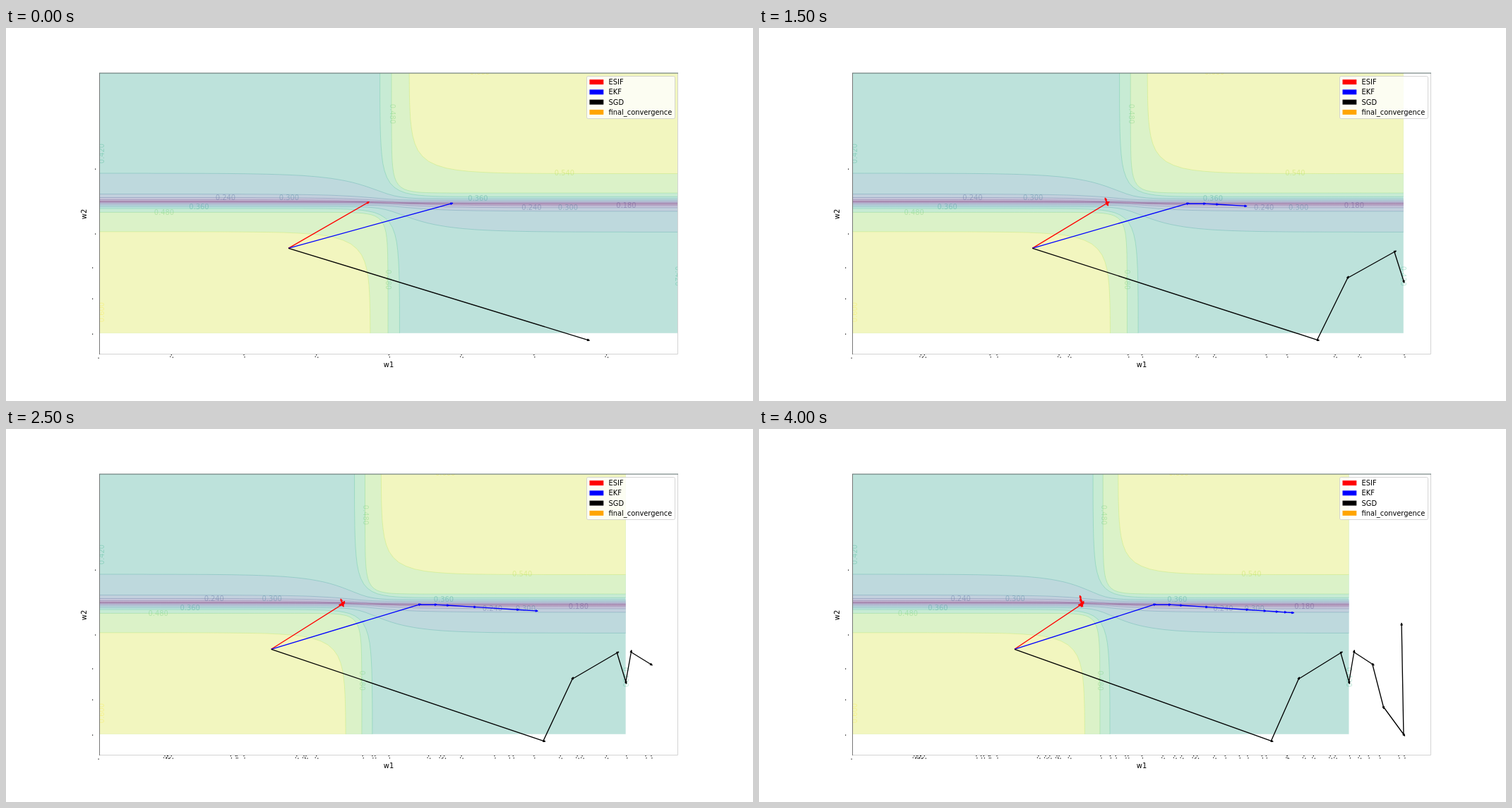
Recreate the animation shown at these times as an HTML page. Size 1058 by 529 pixels, loop 4500 ms.

```html
<!DOCTYPE html>
<html lang="en">
<head>
<meta charset="utf-8">
<title>Optimiser paths</title>
<style>
html, body { margin: 0; width: 100%; height: 100%; overflow: hidden; background: #fff; }
svg { display: block; width: 100vw; height: 100vh; }
text { font-family: "DejaVu Sans", sans-serif; font-size: 9.9px; }
</style>
</head>
<body>
<svg viewBox="0 0 1058 529">
  <defs>
    <clipPath id="area"><rect x="132" y="64" width="820" height="368.8"/></clipPath>
    <clipPath id="axes"><rect x="132" y="64" width="820" height="399"/></clipPath>
  </defs>
  <rect width="1058" height="529" fill="#fff"/>
  <g id="field"><g id="fills" clip-path="url(#area)"></g></g>
  <g id="labels" clip-path="url(#axes)"></g>
  <g fill="none">
    <path d="M132 462.5H951.5V64" stroke="#d4d4d4"/>
    <path d="M132.5 64V463" stroke="#777"/>
    <path d="M132 64H952" stroke="#596b68"/>
  </g>
  <path id="ticks" fill="#111"/>
  <g id="arrows" clip-path="url(#axes)"></g>
  <g id="legend"></g>
  <text x="542" y="480.5" text-anchor="middle">w1</text>
  <text transform="translate(113.5 264) rotate(-90)" text-anchor="middle">w2</text>
</svg>
<script>
const LEFT = 132, WIDTH = 820, STEP = 500, STEPS = 9, TICK = 102.7;
const CX = 543.5, CY = 247.7, ALPHA = .3;

const $ = id => document.getElementById(id);
function add(parent, name, attrs, text = "") {
  const el = document.createElementNS("http://www.w3.org/2000/svg", name);
  for (const k in attrs) el.setAttribute(k, attrs[k]);
  el.textContent = text;
  parent.appendChild(el);
  return el;
}
const range = (n, f) => Array.from({ length: n }, (_, i) => f(i));

// Viridis at the levels 0.12, 0.18 ... 0.60
const viridis = [[68,1,84], [71,45,123], [59,82,139], [44,114,142], [33,145,140], [40,174,128], [94,201,98], [173,220,48], [253,231,37]];
const rgb = c => `rgb(${c.map(Math.round)})`;
const lineColor = level => rgb(viridis[level]);
// Fill between a level and the next, faded onto white
const fillColor = level => rgb(viridis[Math.max(level, 0)].map((v, i) =>
  255 * (1 - ALPHA) + ALPHA * (v + viridis[level + 1][i]) / 2));

const join = pts => pts.map(p => p.map(v => v.toFixed(1))).join("L");
const mirror = pts => pts.map(([x, y]) => [2 * CX - x, 2 * CY - y]);
const softplus = u => Math.log(1 + Math.exp(u));

// Rounded corner that approaches x0 upwards and y0 to the right
const corner = (x0, y0, a, b) => range(97, i => {
  const u = i / 2 - 16;
  return [x0 + a * softplus(u), y0 - b * softplus(-u)];
});
// Slow bend from the left height down to the right height
const bend = (y0, y1) => range(84, i => {
  const x = 130 + 10 * i;
  return [x, y0 + (y1 - y0) * (1 + Math.exp((CX - x) / 13)) ** -.25];
});

const fills = $("fills");
function region(d, level, inside) {
  add(fills, "path", { d: "M" + d + "Z", fill: fillColor(inside), stroke: lineColor(level),
    "stroke-opacity": ALPHA, "stroke-width": .8, "vector-effect": "non-scaling-stroke" });
}
add(fills, "rect", { x: 130, y: 60, width: 830, height: 380, fill: fillColor(4) });
[[529.5, 239.3, 21, 28], [546, 234, 14, 17], [571, 206.5, 40, 25]].forEach((c, i) => {
  const pts = corner(...c);
  region(join(pts) + "V-300", 5 + i, 5 + i);
  region(join(mirror(pts)) + "V800", 5 + i, 5 + i);
});
[[206, 242], [235.5, 244.2], [240.5, 246.2], [243.5, 247.7], [245.5, 248.9]].forEach((ys, i) => {
  const pts = bend(...ys);
  region(join(pts.concat(mirror(pts))), 4 - i, 3 - i);
});

// Level labels: level, x, y, angle
const labels = [
  [2, 311, 240], [3, 401, 240], [4, 273.5, 253], [6, 224, 261.5], [4, 668.5, 241.5],
  [2, 744.5, 254], [3, 796, 254], [1, 878.5, 251], [7, 791, 205.5], [8, 671, 62.5],
  [6, 547, 122, 90], [6, 541.5, 357, 90], [5, 135, 178, -90], [8, 135, 403, -90], [5, 951.5, 352, 90]
].map(([level, x, y, a = 0]) => ({ x, y, a, el: add($("labels"), "text",
  { fill: lineColor(level), "fill-opacity": ALPHA, "text-anchor": "middle" }, (.12 + .06 * level).toFixed(3)) }));

const start = [400, 312.3];
// Jitters around the valley
const esif = [start, ...range(STEPS, n => {
  const i = n + 1;
  return [510.3 - 1.8 * Math.cos(2.6 * i), 249.5 - (4 + .95 * i) * Math.max(0, Math.cos((i - 2) * Math.PI * .4))];
})];
// Slides along the valley
const ekf = [start, ...[630, 655, 674, 716, 783, 812, 832, 846, 858].map(x => [x, 249.2 + .057 * Math.max(0, x - 660)])];
const sgd = [start, [823.7, 442.3], [869, 354.5], [938.5, 317.5], [952.2, 358.5], [960.5, 316.5],
  [990.8, 333.5], [1009, 394], [1042.3, 433], [1039, 278]];

const paths = [["#f00", esif], ["#00f", ekf], ["#000", sgd]].map(([c, pts]) => ({
  pts, el: add($("arrows"), "path", { fill: c, stroke: c, "stroke-width": 1.35, "stroke-linejoin": "round" })
}));

const legend = $("legend");
add(legend, "rect", { x: 822.5, y: 68.5, width: 125, height: 60, rx: 2, fill: "#fff", "fill-opacity": .8, stroke: "#ccc", "stroke-opacity": .8 });
[["ESIF", "#f00"], ["EKF", "#00f"], ["SGD", "#000"], ["final_convergence", "#ffa500"]].forEach(([t, fill], i) => {
  const y = 76.5 + 14.25 * i;
  add(legend, "rect", { x: 826.5, y: y - 3.4, width: 19.8, height: 7, fill });
  add(legend, "text", { x: 853.5, y: y + 3.6 }, t);
});

// The axis grows, with a 5% margin, once a point leaves it
function scaleAt(n) {
  const reach = Math.max(...sgd.slice(0, n + 2).map(p => p[0])) - LEFT;
  return reach > WIDTH ? WIDTH / 1.05 / reach : 1;
}

const dot = (x, y) => `M${x.toFixed(1)} ${y}h1.2v1.2h-1.2z`;
const sideDots = [200, 292, 340, 384, 434].map((y, i) => dot(i < 2 ? 126 : 122, y - .5)).join("");

// Marks of every scale so far stay on the axis
function tickPath(n) {
  let d = sideDots + dot(130.5, 467.5);
  for (const s of new Set(range(n + 1, scaleAt)))
    for (let k = 1, x; (x = LEFT + TICK * k * s) < 920; k++)
      d += dot(x - 1, 463) + (k % 2 ? dot(x - 2.5, 465.5) + dot(x + 1, 466.5) : dot(x, 466));
  return d;
}

function arrowPath(pts, n, s) {
  const q = pts.slice(0, n + 2).map(([x, y]) => [LEFT + (x - LEFT) * s, y]);
  return q.slice(1).map(([x, y], i) => {
    const [x0, y0] = q[i], len = Math.hypot(x - x0, y - y0);
    const u = (x - x0) / len, v = (y - y0) / len;
    return `M${x0} ${y0}L${x} ${y}M${x - v} ${y + u}L${x + 2.6 * u} ${y + 2.6 * v}L${x + v} ${y - u}Z`;
  }).join("");
}

let shown = -1;
function draw(time) {
  const n = Math.floor(time / STEP) % STEPS;
  if (n === shown) return;
  shown = n;
  const s = scaleAt(n);
  $("field").setAttribute("transform", `matrix(${s} 0 0 1 ${LEFT * (1 - s)} 0)`);
  for (const { x, y, a, el } of labels) {
    const px = x < 140 ? x : LEFT + (x - LEFT) * s;
    el.setAttribute("transform", `translate(${px} ${y}) rotate(${a}) translate(0 3.5)`);
  }
  $("ticks").setAttribute("d", tickPath(n));
  for (const p of paths) p.el.setAttribute("d", arrowPath(p.pts, n, s));
}

const begin = performance.now();
function loop() {
  draw(performance.now() - begin);
  requestAnimationFrame(loop);
}
loop();
</script>
</body>
</html>
```
